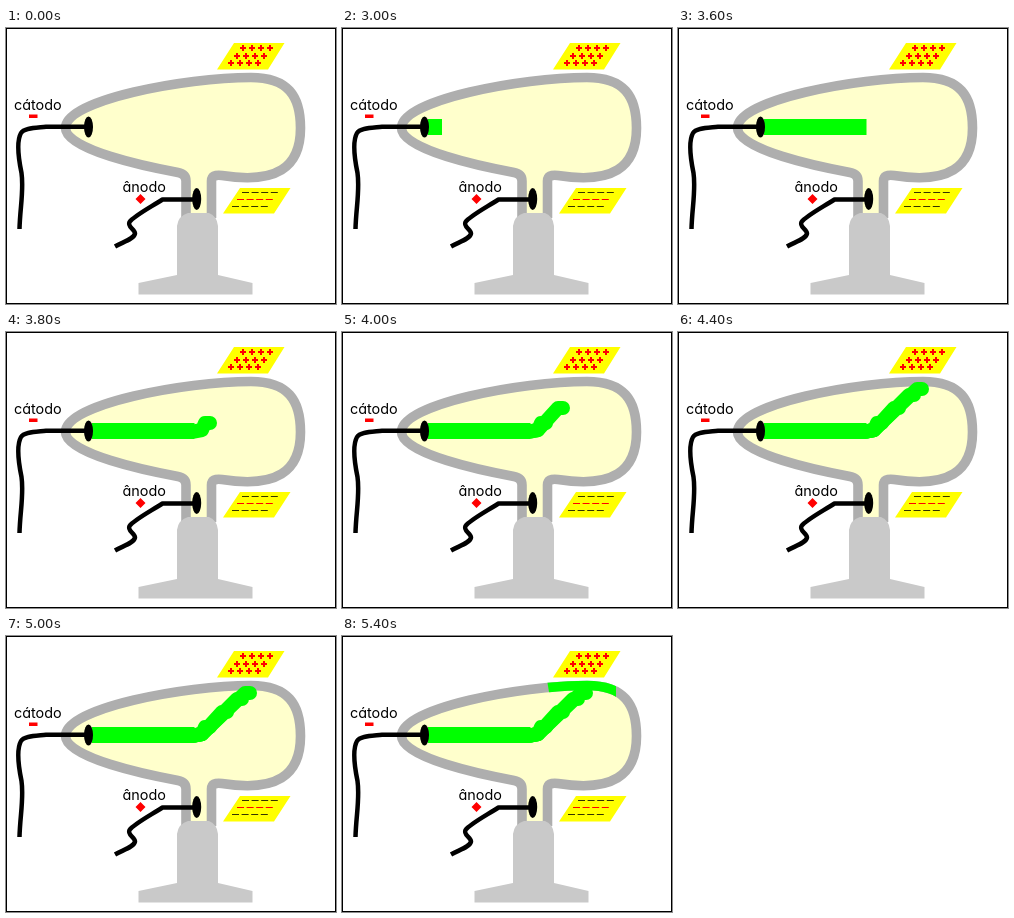
Animation of 330x276 px, one loop 5.6 s. Source, as an HTML page:

```html
<!DOCTYPE html>
<html lang="pt">
<head>
<meta charset="utf-8">
<title>Raios catódicos</title>
<style>
html, body { margin: 0; width: 100%; height: 100%; overflow: hidden; background: #fff; }
svg { display: block; }
text { font: 14.4px Inter, "DejaVu Sans", sans-serif; font-feature-settings: "cv11"; }
.wire { fill: none; stroke: #000; stroke-width: 4.5; stroke-linejoin: round; }
.beam { fill: none; stroke: #0f0; }
</style>
</head>
<body>
<svg width="330" height="276" viewBox="0 0 330 276">
  <defs>
    <path id="bulb" d="M180 190V153Q180 146 172 144.500C142 139 59.500 122 59.500 100C59.500 72 178 49.500 245 49.500C282 49.500 294.500 68 294.500 100C294.500 140 270 156 216 147.500Q205.500 146 205.500 153V190"/>
    <clipPath id="screen"><path d="M205 44H274V62H208Z"/></clipPath>
  </defs>
  <rect x=".5" y=".5" width="329" height="275" fill="#fff" stroke="#000"/>
  <use href="#bulb" fill="#ffc" stroke="#aeaeae" stroke-width="9.6"/>
  <path fill="#c9c9c9" d="M171 247V198Q172 188 182 185H203Q211 188 212 198V247L246.500 255V266.500H132.500V255Z"/>

  <path fill="#ff0" d="M228 15H278.500L262 41.500H211Z M234 160H284.500L268 185.500H217Z"/>
  <g id="signs" fill="none"></g>

  <g id="rays" class="beam"></g>
  <use id="glow" href="#bulb" class="beam" stroke-width="9.6" clip-path="url(#screen)" opacity="0"/>

  <path class="wire" d="M13.500 201C14 180 18 162 15.500 145C12 128 11 112 15 105C18 100 28 100 40 98.800H82"/>
  <path class="wire" d="M109 218.500C117 214 128 211 129 205.500C129 201 121 199 123.500 194C128 188 145 179 156.500 171.500H189"/>
  <ellipse cx="82.5" cy="99" rx="4.5" ry="10.5"/>
  <ellipse cx="190.7" cy="171" rx="4.5" ry="11"/>

  <text x="8" y="81.500">cátodo</text>
  <text x="116.500" y="164">ânodo</text>
  <path fill="#f00" d="M23 86.500H31.500V90H23Z M134.500 166L139.500 171L134.500 176L129.500 171Z"/>
</svg>
<script>
const LOOP = 5600;

function add(parent, name, attrs) {
  const el = document.createElementNS("http://www.w3.org/2000/svg", name);
  for (const key in attrs) el.setAttribute(key, attrs[key]);
  return document.getElementById(parent).appendChild(el);
}

// Each step is [time in ms, opacity]; values are held until the next step.
function blink(el, steps) {
  const frames = [[0, 0], ...steps, [LOOP, steps.at(-1)[1]]];
  el.animate(
    frames.map(([time, opacity]) => ({ offset: time / LOOP, opacity, easing: "step-end" })),
    { duration: LOOP, iterations: Infinity }
  );
}

// Charges on the two plates
[[237, 20], [231, 28], [225, 35]].forEach(([x, y]) => {
  for (let i = 0; i < 4; i++)
    add("signs", "path", { d: `M${x + i * 9 - 3} ${y}h6m-3 -3v6`, stroke: "#f00", "stroke-width": 2 });
});
[[236, 164.5, "#330"], [231, 171.5, "#f00"], [226, 178.5, "#330"]].forEach(([x, y, stroke]) =>
  add("signs", "path", { d: `M${x} ${y}h36`, stroke, "stroke-dasharray": "7 2.6" }));

// The ray grows straight, then bends towards the positive plate
for (const [time, x] of [[3000, 100], [3200, 116], [3400, 147], [3600, 188.5]])
  blink(add("rays", "path", { d: `M86 99H${x}`, "stroke-width": 16, opacity: 0 }), [[time, 1]]);

for (const [time, x, y] of [[3800, 204, 91], [4000, 221, 76], [4200, 236, 63], [4400, 244, 57]])
  blink(add("rays", "path", {
    d: `M188 99.500L196 98L${x - 5} ${y}h5`,
    "stroke-width": 14,
    "stroke-linecap": "round",
    "stroke-linejoin": "round",
    opacity: 0
  }), [[time, 1]]);

blink(document.getElementById("glow"), [[4600, 1], [5000, 0], [5400, 1]]);
</script>
</body>
</html>
```
